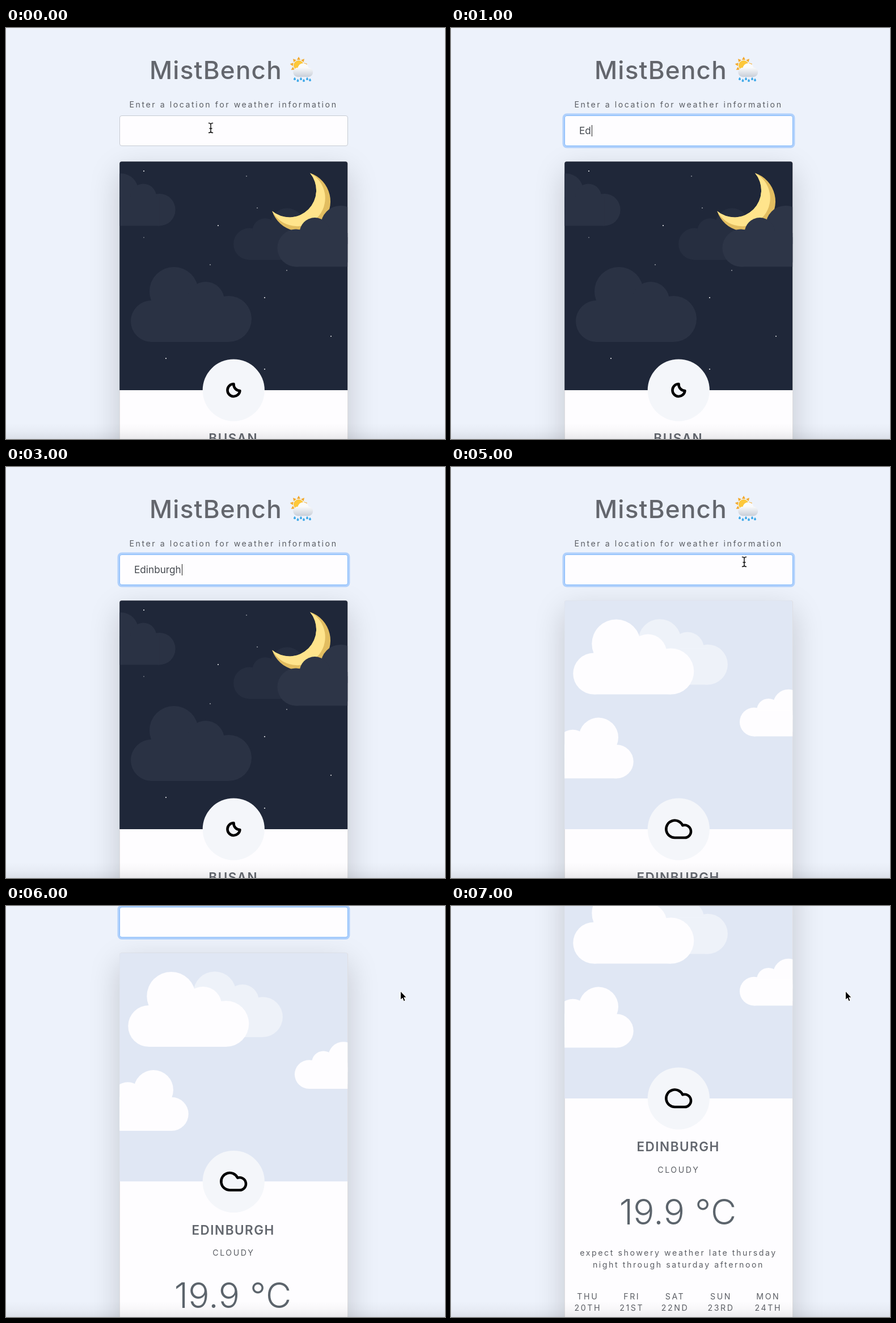
These frames come from a looping animation (774 px wide and 724 px high, 8 s). An HTML page:

```html
<!DOCTYPE html>
<html lang="en">
<head>
<meta charset="utf-8">
<title>Weather lookup</title>
<style>
  html, body { margin: 0; width: 100%; height: 100%; overflow: hidden; background: #edf2fb; }
  body { position: relative; font-family: Inter, sans-serif; }
  #page { position: absolute; left: 0; top: 0; width: 774px; height: 1150px; }
  #page > * { position: absolute; box-sizing: border-box; }
  #card {
    left: 200px; top: 235px; width: 402.5px; height: 880px;
    background: #fefdff; border: 1px solid rgba(0, 0, 0, .125); border-radius: 4px;
    box-shadow: 0 18px 54px rgba(0, 0, 0, .18);
  }
  #field {
    left: 200px; top: 154px; width: 402.5px; height: 54px; padding-left: 25px;
    background: #fefdff; border: 1px solid #c6cbd3; border-radius: 4px;
    font-size: 17.2px; line-height: 52px; color: #45494f; white-space: nowrap;
  }
  #field.focus { border-color: #80b8fb; box-shadow: 0 0 0 3.4px rgba(0, 112, 255, .26); }
  #caret {
    display: inline-block; width: 1px; height: 20px; margin-left: 1px;
    background: #222; vertical-align: -4px;
  }
  svg { position: absolute; left: 0; top: 0; overflow: visible; }
  text { fill: #5b5e64; font-family: Inter, sans-serif; font-size: 14.2px; letter-spacing: 2.55px; text-anchor: middle; }
  .title { font-size: 44px; font-weight: 500; letter-spacing: 1.2px; text-anchor: start; fill: #63666d; }
  .city { font-size: 22.5px; font-weight: 600; letter-spacing: 1.5px; fill: #62666d; }
  .temp { font-size: 62px; font-weight: 300; letter-spacing: .3px; fill: #5c646c; }
  .icon { fill: none; stroke: #000; stroke-width: 4.6; stroke-linejoin: round; }
  #fade {
    position: absolute; left: 0; top: 696px; width: 774px; height: 28px;
    background: linear-gradient(rgba(60, 60, 70, 0), rgba(60, 60, 70, .03) 50%, rgba(60, 60, 70, .1));
  }
</style>
</head>
<body>
<div id="page">
  <div id="card"></div>
  <div id="field"><span id="typed"></span><span id="caret"></span></div>
  <svg width="774" height="1150">
    <defs>
      <clipPath id="frame"><path d="M200.2 638V239.3a4 4 0 0 1 4-4H598.200a4 4 0 0 1 4 4V638z"/></clipPath>
      <linearGradient id="puff" gradientUnits="userSpaceOnUse" x1="0" y1="62" x2="0" y2="87">
        <stop offset=".3" stop-color="#fafbfc"/><stop offset="1" stop-color="#c6ccd6"/>
      </linearGradient>
      <g id="cloud">
        <circle cx="36.5" cy="-36.5" r="36.5"/><circle cx="172.5" cy="-40.5" r="40.5"/>
        <circle cx="76" cy="-89" r="43"/><circle cx="132" cy="-73" r="33"/>
        <path d="M36.5 0V-73H172.5V0z"/>
      </g>
    </defs>

    <text class="title" x="253" y="90">MistBench</text>
    <g id="badge">
      <g id="rays" fill="#f3a92c"></g>
      <circle cx="516" cy="66" r="9" fill="#fdc83a"/>
      <g fill="url(#puff)">
        <circle cx="514.5" cy="78" r="8.2"/><circle cx="524" cy="71.500" r="9.5"/>
        <circle cx="533" cy="78" r="8.200"/><path d="M514.5 74H533V86.200H514.500z"/>
      </g>
      <g id="drops" fill="#3fa9e8"></g>
    </g>
    <text x="401" y="139.5">Enter a location for weather information</text>

    <g clip-path="url(#frame)">
      <g id="night">
        <path fill="#1f2739" d="M200 235H603V638H200z"/>
        <g id="stars" fill="#fff"></g>
        <g id="backClouds"></g>
        <path fill="#e2bd60" d="M536 255.5A52.8 52.8 0 1 1 469.2 322.5A47.500 47.500 0 0 0 536 255.500z"/>
        <path fill="#ffe48c" d="M536 255.5A49.6 49.6 0 1 1 469.2 322.5A47.500 47.500 0 0 0 536 255.500z"/>
        <g id="frontClouds"></g>
      </g>
      <g id="day">
        <path fill="#e0e7f4" d="M200 235H603V638H200z"/>
        <g id="dayClouds"></g>
      </g>
    </g>

    <circle cx="401.3" cy="638" r="54.6" fill="#f4f6fa"/>
    <path id="moonIcon" class="icon" d="M401.5 627A11 11 0 1 0 412.4 639A11 11 0 0 1 401.5 627z"/>
    <path id="cloudIcon" class="icon" d="M411.8 653H394.5A15.2 15.2 0 1 1 408.3 631.4A11.1 11.1 0 1 1 411.8 653z"/>

    <text id="city" class="city" x="400.7" y="731"></text>
    <g id="report">
      <text x="401.3" y="768.5">CLOUDY</text>
      <text class="temp" x="400" y="860">19.9 °C</text>
      <text x="401" y="915">expect showery weather late thursday</text>
      <text x="401" y="936">night through saturday afternoon</text>
      <g id="days"></g>
    </g>
  </svg>
</div>
<div id="fade"></div>
<svg width="774" height="724">
  <path id="ibeam" fill="none" stroke="#111" stroke-width="1.5" stroke-linecap="round"
        d="M-3.5 -8.5Q-.5 -8.5 0 -6.5Q.5 -8.5 3.5 -8.5M0 -6.5V6.5M-3.5 8.5Q-.5 8.5 0 6.5Q.5 8.5 3.5 8.5M-2 1H2"/>
  <path id="arrow" d="M695.5 150V165.5L699 162.2L701.3 167.8L704 166.6L701.7 161.2H706.2z"
        fill="#000" stroke="#fff" stroke-width="1"/>
</svg>

<script>
const $ = id => document.getElementById(id);
const fill = (id, items, draw) => { $(id).innerHTML = items.map(draw).join(''); };

// x is the left edge, or the right edge when the scale is negative
const cloud = ([x, bottom, s, color]) =>
  `<use href="#cloud" fill="${color}" transform="translate(${x} ${bottom}) scale(${s} ${Math.abs(s)})"/>`;

fill('backClouds', [[548, 408.5, -.69, '#262e40']], cloud);
fill('frontClouds', [
  [150, 348.5, .698, '#2a3244'],
  [652, 420.5, -.815, '#2d3547'],
  [220, 553, 1, '#2a3244']
], cloud);
fill('dayClouds', [
  [301.5, 383.5, .875, '#eef2f9'],
  [215.3, 400.5, 1, '#fefdff'],
  [321.7, 548.5, -.81, '#fefdff'],
  [642.5, 474.5, -.627, '#fefdff']
], cloud);

fill('stars', [
  [243, 252, .9], [424, 261, .45], [443, 317, .5], [374, 348, .9], [243, 369, .35], [360, 417, .5],
  [495, 427, .5], [456, 475, .9], [573, 543, .8], [282, 582, .9], [456, 601, .9]
], ([x, y, a]) => `<circle cx="${x}" cy="${y}" r="1.1" opacity="${a}"/>`);

fill('rays', [...Array(9).keys()],
  i => `<path d="M513 56L516 50.5L519 56z" transform="rotate(${i * 40} 516 66)"/>`);
fill('drops', [[509, 90], [514.5, 93], [520, 90], [525, 93], [531, 90], [536, 92]],
  ([x, y]) => `<path d="M${x} ${y - 3.5}q4 5 0 5.5q-4 -.5 0 -5.5z"/>`);

fill('days', [
  [241.3, 'THU', '20TH'], [318.7, 'FRI', '21ST'], [395, 'SAT', '22ND'],
  [476, 'SUN', '23RD'], [559.3, 'MON', '24TH']
], ([x, day, date]) => `<text x="${x}" y="991.5">${day}</text><text x="${x}" y="1012">${date}</text>`);

const STEP = 1000;
const steps = [
  { beam: [361, 176], idle: true },
  { text: 'Ed' },
  { text: 'Edin' },
  { text: 'Edinburgh' },
  {},
  { day: true, beam: [517, 167] },
  { day: true, scroll: 152.5, arrow: true },
  { day: true, scroll: 299, arrow: true }
];

const show = (id, on) => { $(id).style.display = on ? '' : 'none'; };

function render({ text = '', idle, day, beam, arrow, scroll = 0 }) {
  $('page').style.transform = scroll ? `translateY(${-scroll}px)` : 'none';
  $('field').className = idle ? '' : 'focus';
  $('typed').textContent = text;
  show('caret', text);
  show('night', !day);
  show('moonIcon', !day);
  show('day', day);
  show('cloudIcon', day);
  show('report', day);
  $('city').textContent = day ? 'EDINBURGH' : 'BUSAN';
  show('ibeam', beam);
  if (beam) $('ibeam').setAttribute('transform', `translate(${beam})`);
  show('arrow', arrow);
}

const start = performance.now();
let current = -1;
function tick() {
  const i = Math.floor((performance.now() - start) / STEP) % steps.length;
  if (i !== current) render(steps[current = i]);
  requestAnimationFrame(tick);
}
tick();
</script>
</body>
</html>
```
